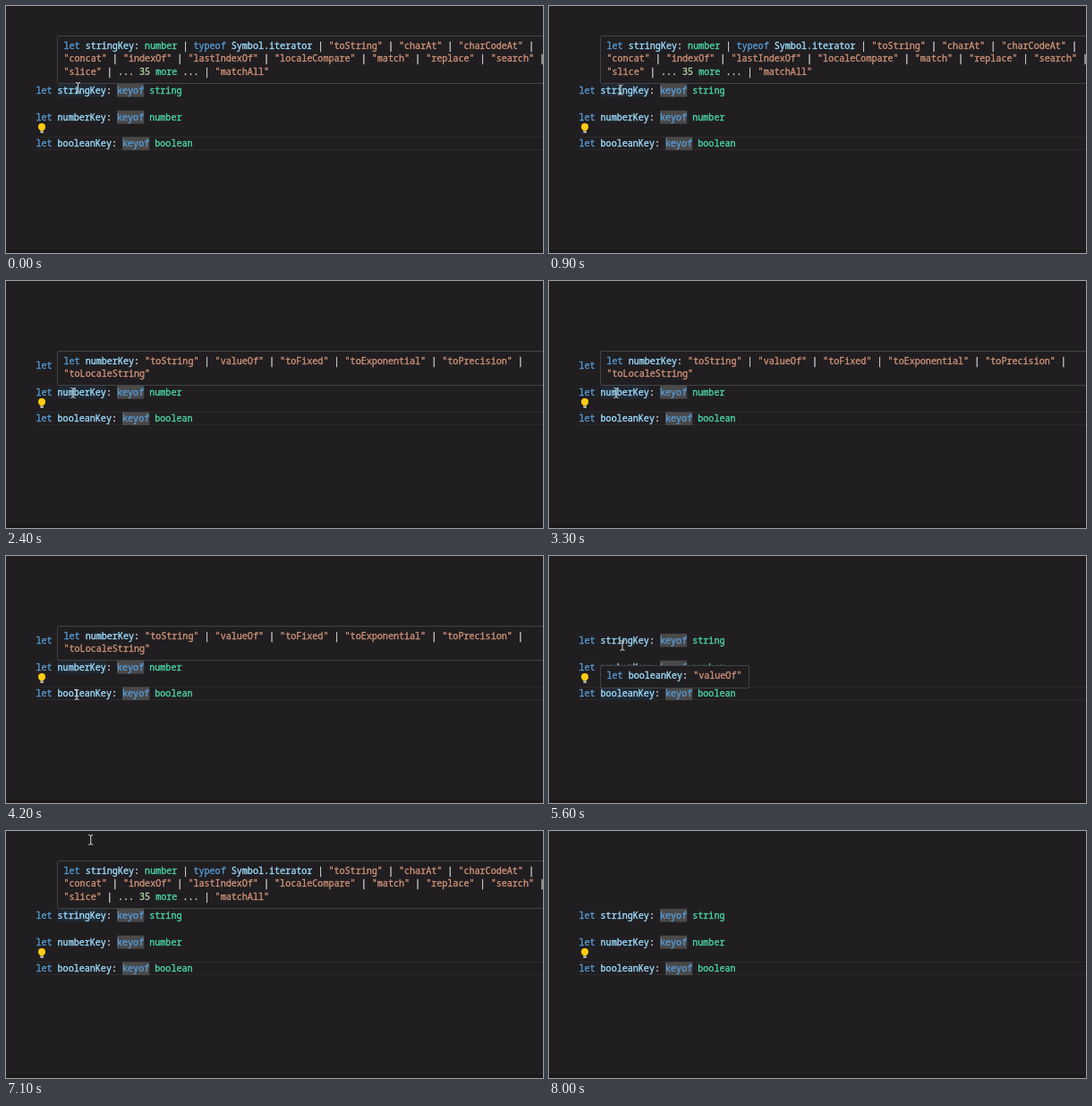
Animation of 600x276 px, one loop 8100 ms. Source, as an HTML page with a canvas:

```html
<!DOCTYPE html>
<html lang="en">
<head>
<meta charset="utf-8">
<title>keyof hovers</title>
<style>
html, body { margin: 0; width: 100%; height: 100%; overflow: hidden; background: #201e20; }
canvas { display: block; width: 600px; height: 276px; }
</style>
</head>
<body>
<canvas id="stage"></canvas>
<script>
const LOOP = 8100, W = 600, H = 276, CHAR = 6.04, LEFT = 33.4, ROW = 14.85;
const canvas = document.getElementById('stage');
const ctx = canvas.getContext('2d');
const ratio = window.devicePixelRatio || 1;
canvas.width = W * ratio;
canvas.height = H * ratio;

const COLORS = {
  bg: '#201e20', foot: '#1c191a', rule: '#2b2a2b', border: '#434344',
  match: '#4a494a', hover: '#202831', plain: '#d8d8d8', keyword: '#569cd6',
  name: '#9cdcfe', type: '#4ad6a8', string: '#ce9178', number: '#b5cea8'
};

const LINES = [
  { name: 'stringKey', type: 'string', y: 97.6 },
  { name: 'numberKey', type: 'number', y: 127.6 },
  { name: 'booleanKey', type: 'boolean', y: 157.1 }
];

const TIPS = [
  { top: 33.5, bottom: 86.5, right: 610, y: 47.6, rows: [
    'let stringKey: number | typeof Symbol.iterator | "toString" | "charAt" | "charCodeAt" |',
    '"concat" | "indexOf" | "lastIndexOf" | "localeCompare" | "match" | "replace" | "search" |',
    '"slice" | ... 35 more ... | "matchAll"'] },
  { top: 78.5, bottom: 116.5, right: 610, y: 92.5, rows: [
    'let numberKey: "toString" | "valueOf" | "toFixed" | "toExponential" | "toPrecision" |',
    '"toLocaleString"'] },
  { top: 122.5, bottom: 147.5, right: 223.5, y: 136.8, rows: [
    'let booleanKey: "valueOf"'] }
];

// Hover periods: which line, fade-in start and end, fade-out start and end.
const HOVERS = [
  { line: 0, show: [-200, -100], hide: [1000, 1100] },
  { line: 1, show: [1300, 1430], hide: [4230, 4300] },
  { line: 2, show: [4350, 4480], hide: [5700, 5800] },
  { line: 0, show: [6250, 6400], hide: [7400, 7500] }
];

// Pointer stops: time, x, y.
const POINTER = [
  [0, 80.5, 91], [850, 80.5, 91], [1150, 75, 125], [3850, 75, 125],
  [4150, 79, 155], [5300, 79, 155], [5600, 82, 100], [5850, 81, 92],
  [6850, 81, 92], [7200, 98, -10]
];

const clamp = v => Math.max(0, Math.min(1, v));
const ramp = (t, [a, b]) => clamp((t - a) / (b - a));
const smooth = p => p * p * (3 - 2 * p);

function rect(x, y, w, h, color) {
  ctx.fillStyle = color;
  ctx.fillRect(x, y, w, h);
}

function tokenColor(s) {
  if (s[0] === '"') return COLORS.string;
  if (/^(let|keyof|typeof)$/.test(s)) return COLORS.keyword;
  if (/Key$|^Symbol/.test(s)) return COLORS.name;
  if (/^\d/.test(s)) return COLORS.number;
  return /^\w/.test(s) ? COLORS.type : COLORS.plain;
}

// A thin outline gives the letters their slightly heavy look.
function code(text, x, y) {
  ctx.lineWidth = 0.35;
  for (const m of text.matchAll(/"[^"]*"|\w+(\.\w+)?|\.{3}|[:|]/g)) {
    const at = x + m.index * CHAR;
    ctx.fillStyle = ctx.strokeStyle = tokenColor(m[0]);
    ctx.fillText(m[0], at, y);
    ctx.strokeText(m[0], at, y);
  }
}

function bulb() {
  ctx.fillStyle = '#ffcc12';
  ctx.beginPath();
  ctx.arc(40, 135, 4, 0, 7);
  ctx.fill();
  rect(38, 137, 4, 2.5, '#ffcc12');
  rect(38.4, 139.5, 3.4, 2.5, '#b9b3a4');
}

function editor(hovered) {
  rect(0, 0, W, H, COLORS.bg);
  rect(0, 272, W, 4, COLORS.foot);
  rect(34, 146, W, 1, COLORS.rule);
  rect(34, 160, W, 1, COLORS.rule);
  LINES.forEach((line, i) => {
    const top = line.y - 10.8;
    const start = LEFT + 4 * CHAR;
    const n = line.name.length;
    if (i === hovered) rect(start, top, n * CHAR, ROW, COLORS.hover);
    rect(start + (n + 2) * CHAR, top, 5 * CHAR, ROW, COLORS.match);
    code(`let ${line.name}: keyof ${line.type}`, LEFT, line.y);
  });
  bulb();
}

function tooltip(tip, alpha) {
  ctx.globalAlpha = alpha;
  ctx.beginPath();
  ctx.roundRect(57.5, tip.top, tip.right - 57.5, tip.bottom - tip.top, 1.5);
  ctx.fillStyle = COLORS.bg;
  ctx.fill();
  ctx.strokeStyle = COLORS.border;
  ctx.lineWidth = 1;
  ctx.stroke();
  tip.rows.forEach((row, i) => code(row, 64.5, tip.y + i * ROW));
  ctx.globalAlpha = 1;
}

function pointer(t) {
  const i = POINTER.findIndex(p => p[0] > t);
  if (i < 1) return;
  const [t0, x0, y0] = POINTER[i - 1], [t1, x1, y1] = POINTER[i];
  const p = smooth((t - t0) / (t1 - t0));
  const x = x0 + (x1 - x0) * p, y = y0 + (y1 - y0) * p;
  ctx.strokeStyle = '#d8d8d8';
  ctx.lineWidth = 1;
  ctx.beginPath();
  for (const s of [-1, 1]) {
    ctx.moveTo(x - 2.5, y + s * 5.5);
    ctx.quadraticCurveTo(x, y + s * 5.5, x, y + s * 4);
    ctx.quadraticCurveTo(x, y + s * 5.5, x + 2.5, y + s * 5.5);
  }
  ctx.moveTo(x, y - 4.5);
  ctx.lineTo(x, y + 4.5);
  ctx.stroke();
}

function draw(t) {
  ctx.setTransform(ratio, 0, 0, ratio, 0, 0);
  ctx.font = '10.07px "Noto Sans Mono", "DejaVu Sans Mono", monospace';
  ctx.lineJoin = 'round';
  const hover = HOVERS.find(h => t >= h.show[0] && t < h.hide[1]);
  editor(hover ? hover.line : -1);
  if (hover) tooltip(TIPS[hover.line], ramp(t, hover.show) * (1 - ramp(t, hover.hide)));
  pointer(t);
}

const begin = performance.now();
function tick() {
  draw((performance.now() - begin) % LOOP);
  requestAnimationFrame(tick);
}
tick();
</script>
</body>
</html>
```
